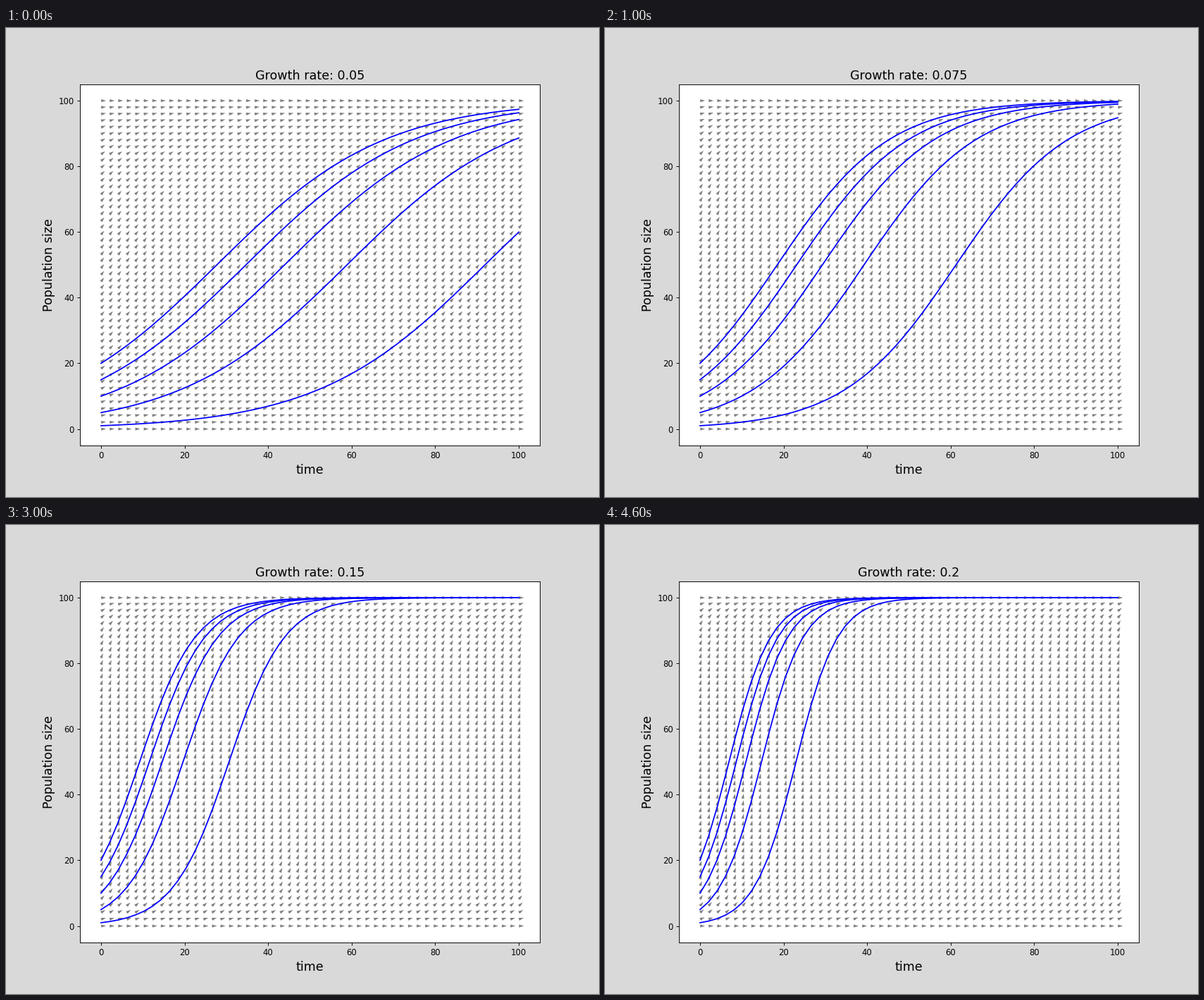
Animation of 842 by 665 pixels, one loop 5000 ms. Source, as a matplotlib script:

```python
import numpy as np
import matplotlib.pyplot as plt
from matplotlib.animation import FuncAnimation

DPI = 84.2
CAPACITY = 100
RATES = [0.05, 0.075, 0.1, 0.15, 0.2]
STARTS = [1, 5, 10, 15, 20]
FONT_SIZE = 15

plt.rcParams["font.family"] = "DejaVu Sans"

t = np.linspace(0, 100, 50)
T, N = np.meshgrid(t, np.linspace(0, CAPACITY, 50))


def logistic(n0, rate):
    return CAPACITY / (1 + (CAPACITY / n0 - 1) * np.exp(-rate * t))


def directions(rate):
    """Unit vectors of the slope field."""
    slope = rate * N * (1 - N / CAPACITY)
    norm = np.hypot(1, slope)
    return 1 / norm, slope / norm


fig, ax = plt.subplots(figsize=(10, 7.898), dpi=DPI, facecolor="#d9d9d9")
fig.subplots_adjust(left=0.125, right=0.9, bottom=0.11, top=0.88)
ax.set_xlim(-5, 105)
ax.set_ylim(-5, 105)
ax.set_xlabel("time", fontsize=FONT_SIZE)
ax.set_ylabel("Population size", fontsize=FONT_SIZE)
title = ax.set_title("", fontsize=FONT_SIZE)

field = ax.quiver(T, N, *directions(RATES[0]), color="gray")
curves = [ax.plot(t, logistic(n0, RATES[0]), color="blue", lw=1.5)[0]
          for n0 in STARTS]


def update(i):
    rate = RATES[i]
    title.set_text(f"Growth rate: {rate}")
    field.set_UVC(*directions(rate))
    for curve, n0 in zip(curves, STARTS):
        curve.set_ydata(logistic(n0, rate))
    return [title, field, *curves]


anim = FuncAnimation(fig, update, frames=len(RATES), interval=1000,
                     init_func=lambda: update(0), repeat=True, repeat_delay=0)
plt.show()
```
